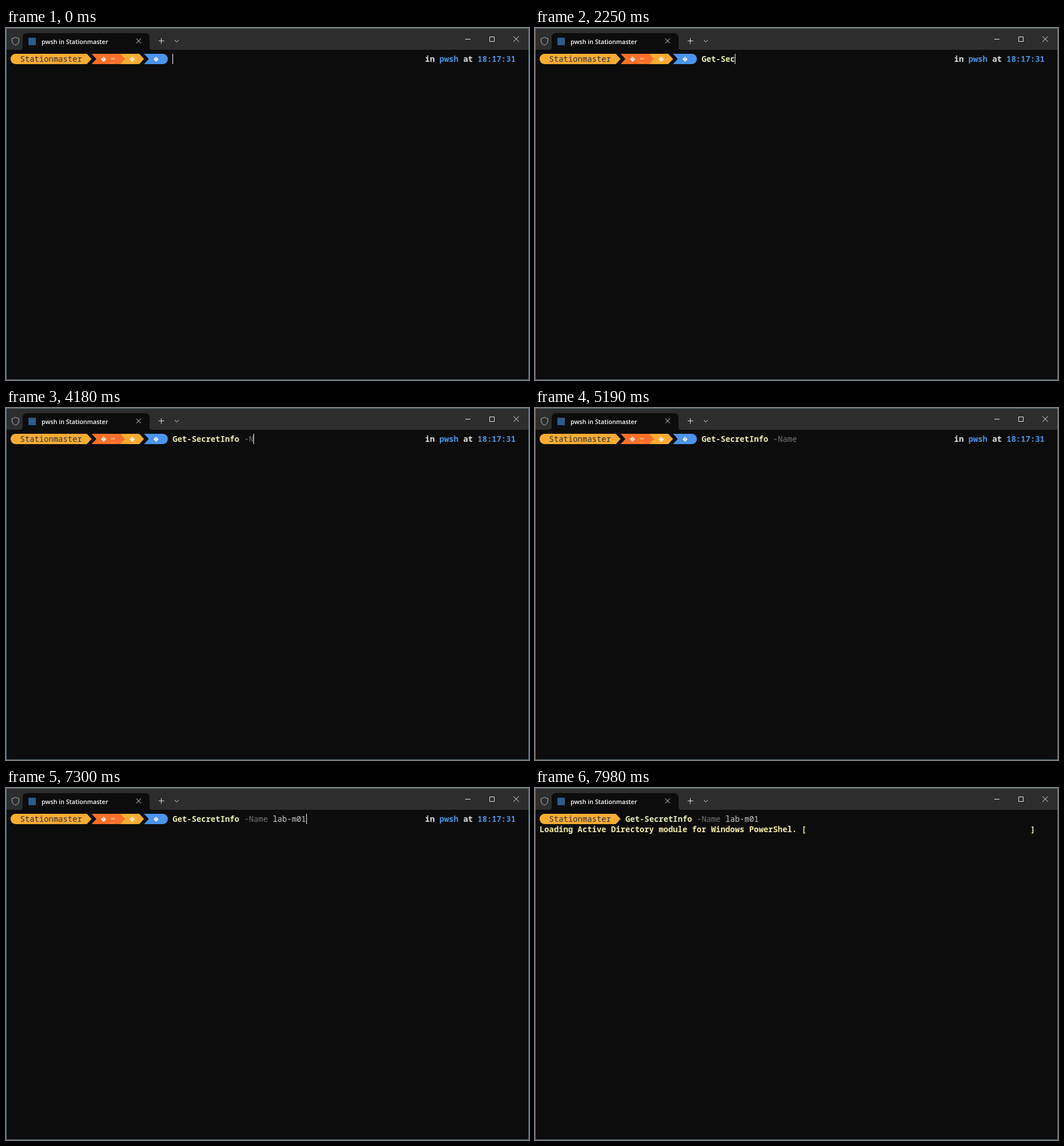
An HTML page for the animation above (8000 ms loop, 911 by 614 pixels).

```html
<!DOCTYPE html>
<html lang="en">
<head>
<meta charset="utf-8">
<title>Terminal</title>
<style>
  html, body { margin: 0; width: 100%; height: 100%; overflow: hidden; background: #0c0c0c; }
  svg { display: block; width: 100%; height: 100%; }
  text { white-space: pre; }
  .mono { font: 500 13.83px "Noto Sans Mono", monospace; }
  .strong { font-weight: 600; }
  .tab { font: 600 10.7px "Open Sans", sans-serif; }
  .icon { fill: none; stroke: #e8e8e8; stroke-width: 1; }
</style>
</head>
<body>
<svg viewBox="0 0 911 614">
  <defs>
    <g id="unknown">
      <path d="M0-4.5 4.5 0 0 4.5-4.5 0Z" fill="#f4f0ec"/>
      <path d="M-1.2-1.2Q0-2.6 1.1-1.2Q1.2-.5 0 .5M0 1.5V2.3" fill="none" stroke="currentColor" stroke-width=".9"/>
    </g>
  </defs>

  <!-- Window frame and title bar -->
  <rect width="911" height="614" fill="#0c0c0c"/>
  <rect width="911" height="38" fill="#2d2d2d"/>
  <path d="M25 38Q29 38 29 33V17Q29 9 37 9H242Q250 9 250 17V33Q250 38 254 38Z" fill="#0c0c0c"/>
  <path class="icon" d="M16.5 16Q19 18 22.5 18.3V23Q22.3 27.5 16.5 30.3Q10.7 27.5 10.5 23V18.3Q14 18 16.5 16Z" stroke="#bbb" style="stroke:#b5b5b5"/>
  <rect x="39" y="17" width="13" height="13" fill="#2f5b8c"/>
  <text class="tab" x="62" y="27.5" fill="#fff">pwsh in Stationmaster</text>
  <path class="icon" d="M227 18.5 235 26.5M235 18.5 227 26.5M266 22.5H275.5M270.5 18V27.5M294 21 297.5 24.5 301 21"/>
  <path class="icon" d="M800 19.5H809M842.5 15.5H850.5V23.5H842.5ZM884 14.5 893.5 24M893.5 14.5 884 24"/>
  <rect x=".5" y=".5" width="910" height="613" fill="none" stroke="#5f7986"/>

  <!-- Prompt -->
  <path d="M16.3 45H140.8L149.1 54 140.8 63H16.3A8.3 9 0 0 1 16.3 45Z" fill="#f8ac33"/>
  <text class="mono" x="24.6" y="59" fill="#2a3040">Stationmaster</text>
  <g id="segments">
    <path d="M198.9 45H232.1L240.4 54 232.1 63H198.9Z" fill="#f8ac33"/>
    <path d="M149.1 45H198.9L207.2 54 198.9 63H149.1L157.4 54Z" fill="#f8702a"/>
    <path d="M240.4 45H273.6A8.3 9 0 0 1 273.6 63H240.4L248.7 54Z" fill="#4a94ec"/>
    <use href="#unknown" x="170" y="54.5" color="#f8702a"/>
    <use href="#unknown" x="220" y="54.5" color="#f8ac33"/>
    <use href="#unknown" x="261.5" y="54.5" color="#4a94ec"/>
    <text class="mono" x="182.3" y="59" fill="#f4f0ec">~</text>
    <path d="M182.5 60.5H190" stroke="#f4d0b8" stroke-dasharray="1 1"/>
    <text class="mono strong" x="730.1" y="59" fill="#e2e2e2">in <tspan fill="#4a94e4">pwsh</tspan> at <tspan fill="#4a94e4">18:17:31</tspan></text>
  </g>

  <g id="line" class="mono">
    <text id="command" class="strong" y="59" fill="#f1efb0"></text>
    <text id="parameter" x="124.5" y="59"></text>
    <text id="argument" x="174.3" y="59" fill="#ccc"></text>
  </g>
  <g id="progress" class="mono strong" fill="#f4eca0">
    <text x="8" y="77">Loading Active Directory module for Windows PowerShel. [</text>
    <text x="862.9" y="77">]</text>
  </g>
  <rect id="cursor" width="1" height="18" fill="#fff"/>
</svg>
<script>
const LOOP = 8000, CELL = 8.3, LEFT = 8;
const ENTER = 7380, NEW_LINE = 7440, LOADING = 7900;
const COMMAND = "Get-SecretInfo -Name lab-m01";
const KEY_TIMES = [
  980, 1190, 1250, 1560, 1780, 2040, 2250, 2470, 2560, 2640,
  3130, 3320, 3370, 3530, 3720, 3910, 4180, 4320, 4410, 4500, 4600,
  5350, 5440, 5660, 5730, 6250, 6470, 6570
];
const CURSOR_OFF = [[570, 840], [5190, 5270], [7110, 7300], [LOADING, LOOP]];

const el = id => document.getElementById(id);
const column = n => LEFT + n * CELL;
const show = (id, on) => el(id).setAttribute("visibility", on ? "visible" : "hidden");

function render(t) {
  const count = KEY_TIMES.filter(time => time <= t).length;
  const typed = COMMAND.slice(0, count);
  const entered = t >= ENTER;
  const start = column(entered ? 18 : 34);

  el("command").textContent = typed.slice(0, 14);
  el("parameter").textContent = typed.slice(15, 20);
  el("parameter").setAttribute("fill", count > 16 ? "#767676" : "#ccc");
  el("argument").textContent = typed.slice(21);
  el("line").setAttribute("transform", `translate(${start} 0)`);

  show("segments", !entered);
  show("progress", t >= LOADING);
  show("cursor", !CURSOR_OFF.some(([from, to]) => t >= from && t < to));
  const onNewLine = t >= NEW_LINE;
  el("cursor").setAttribute("x", Math.round(onNewLine ? LEFT : start + count * CELL));
  el("cursor").setAttribute("y", onNewLine ? 63 : 45);
}

const begin = performance.now();
function tick() {
  render((performance.now() - begin) % LOOP);
  requestAnimationFrame(tick);
}
tick();
</script>
</body>
</html>
```
